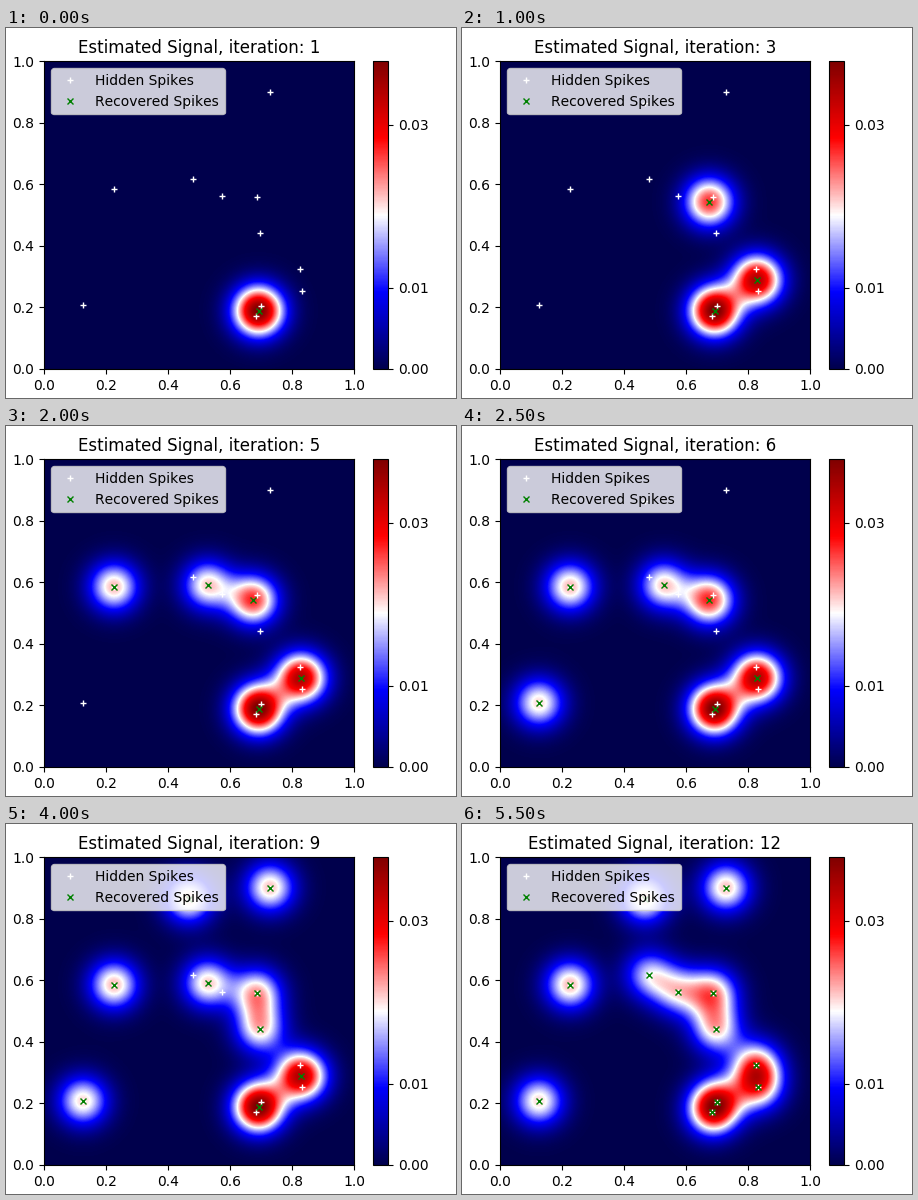
These frames come from a looping animation (450 px wide and 370 px high, 6000 ms). A matplotlib script:

```python
import numpy as np
import matplotlib.pyplot as plt
from matplotlib.animation import FuncAnimation

W, H, DPI = 450, 370, 100
STEP_MS = 500
SIGMA, V_MAX = 0.0575, 0.0378
plt.rcParams.update({"font.family": "DejaVu Sans", "font.size": 10,
                     "text.kerning_factor": 6})

# x, y and strength relative to V_MAX
HIDDEN = {
    "a": (0.700, 0.205, 0.53), "b": (0.684, 0.172, 0.53),
    "c": (0.826, 0.325, 0.54), "d": (0.832, 0.254, 0.54),
    "e": (0.697, 0.442, 0.51), "f": (0.687, 0.559, 0.55),
    "g": (0.574, 0.563, 0.42), "i": (0.481, 0.618, 0.42),
    "h": (0.226, 0.585, 0.57), "j": (0.126, 0.208, 0.54),
    "k": (0.729, 0.901, 0.56), "l": (0.467, 0.865, 0.55)}

# Hidden spikes explained by each new estimate, one entry per iteration
ARRIVALS = ["ab", "cd", "efg", "h", "gi", "j", "k", "l",
            "e f", "g i", "c d", "a b"]

AXIS = (np.arange(310) + 0.5) / 310


def bell(squared_distance):
    return np.exp(-squared_distance / (2 * SIGMA ** 2))


def peak(group):
    """Climb by mean shift to the top of the group's blurred sum."""
    spikes = np.array([HIDDEN[name] for name in group])
    points, strength = spikes[:, :2], spikes[:, 2]
    top = points.mean(axis=0)
    for _ in range(100):
        pull = strength * bell(((points - top) ** 2).sum(axis=1))
        top = pull @ points / pull.sum()
    return *top, pull.sum()


def estimate(iteration):
    """A group gives way once a part of it has its own estimate."""
    groups = [set(g) for entry in ARRIVALS[:iteration] for g in entry.split()]
    return np.array([peak(sorted(g)) for g in groups
                     if not any(other < g for other in groups)])


def signal(spikes):
    x, y, weight = spikes.T
    columns = bell((AXIS[:, None] - x) ** 2)
    rows = bell((AXIS[:, None] - y) ** 2)
    return V_MAX * (rows * weight) @ columns.T


def pixel_axes(left, top, right, bottom):
    return fig.add_axes([left / W, 1 - bottom / H,
                         (right - left) / W, (bottom - top) / H])


fig = plt.figure(figsize=(W / DPI, H / DPI), dpi=DPI, facecolor="white")
ax = pixel_axes(38, 33.3, 348, 341)
cax = pixel_axes(367, 33.3, 382.4, 341)

image = ax.imshow(np.zeros((310, 310)), cmap="seismic", vmin=0, vmax=V_MAX,
                  origin="lower", extent=(0, 1, 0, 1), aspect="auto")
fig.colorbar(image, cax=cax, ticks=[0, 0.01, 0.03], format="%.2f")

hidden_x, hidden_y, _ = zip(*HIDDEN.values())
ax.plot(hidden_x, hidden_y, "w+", ms=4, label="Hidden Spikes")
crosses, = ax.plot([], [], "gx", ms=4, label="Recovered Spikes")
ax.set(xlim=(0, 1), ylim=(0, 1))
ax.legend(loc="upper left")
title = ax.set_title("")


def update(frame):
    iteration = frame + 1
    spikes = estimate(iteration)
    image.set_data(signal(spikes))
    crosses.set_data(spikes[:, 0], spikes[:, 1])
    title.set_text(f"Estimated Signal, iteration: {iteration}")
    return image, crosses, title


anim = FuncAnimation(fig, update, frames=len(ARRIVALS), interval=STEP_MS,
                     repeat=True, repeat_delay=0, blit=False)
plt.show()
```
